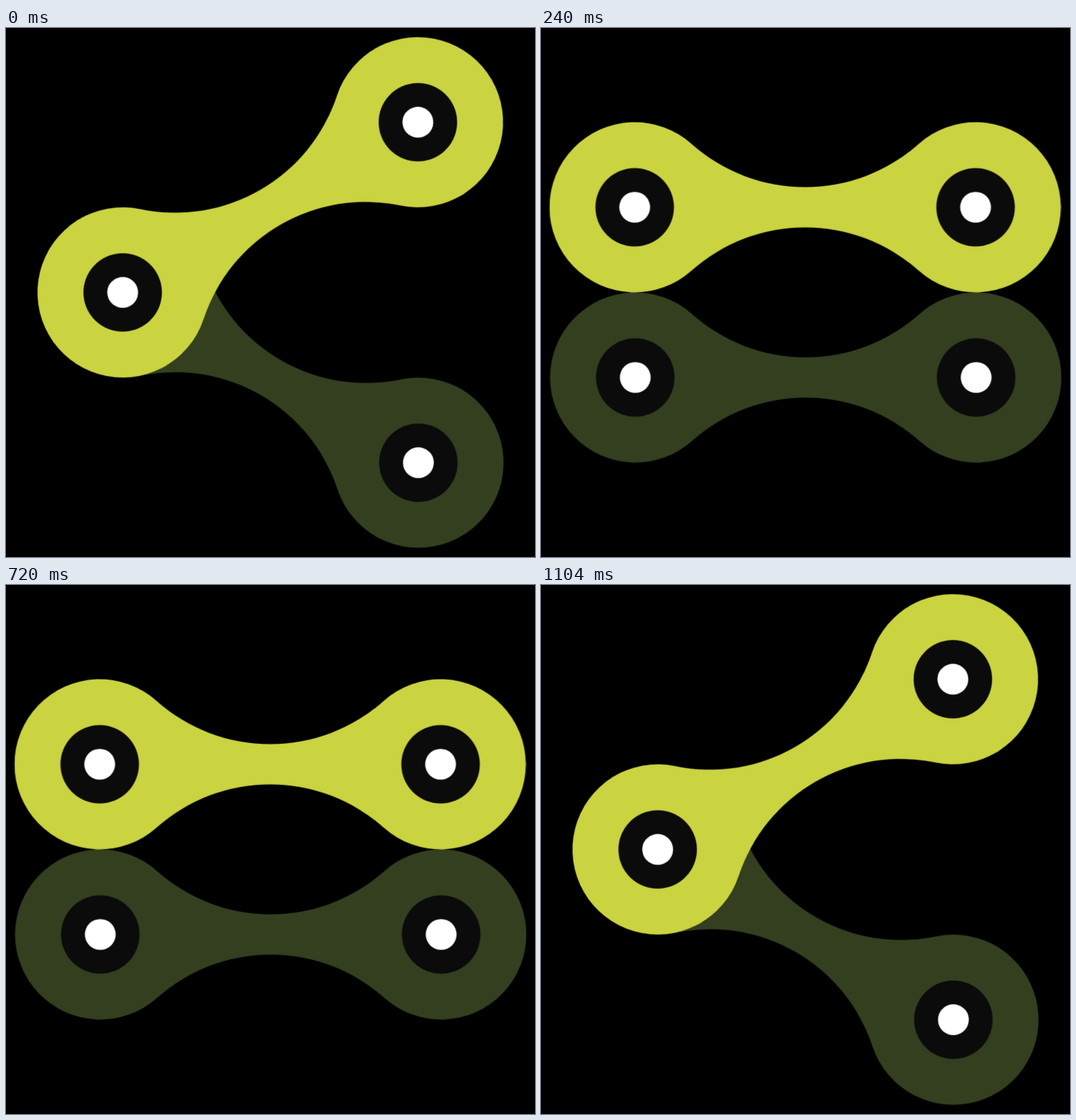
Animation of 748x749 px, one loop 1.2 s. Source, as an HTML page without scripts:

```html
<!DOCTYPE html>
<html lang="en">
<head>
<meta charset="utf-8">
<title>Chain links</title>
<style>
  html, body { margin: 0; width: 100%; height: 100%; overflow: hidden; background: #000; }
  svg { display: block; width: 100%; height: 100%; }

  .link { animation: 1200ms step-end infinite; }
  .lime { fill: #cad340; animation-name: rock-lime; }
  .moss { fill: #333f1f; animation-name: rock-moss; }
  .front { animation: 1200ms step-end infinite come-forward; }

  @keyframes rock-lime {
    0%, 80%, 100% { transform: translate(373.7px, 253.9px) rotate(-30deg); }
    20%, 60% { transform: translate(373.5px, 253.8px) rotate(0deg); }
    40% { transform: translate(374.2px, 253.7px) rotate(30deg); }
  }
  @keyframes rock-moss {
    0%, 80%, 100% { transform: translate(374.4px, 495px) rotate(30deg); }
    20%, 60% { transform: translate(374.3px, 494.8px) rotate(0deg); }
    40% { transform: translate(374.4px, 495px) rotate(-30deg); }
  }
  /* The moss link passes over the lime one only at the right-hand joint. */
  @keyframes come-forward {
    0%, 60%, 100% { visibility: hidden; }
    40% { visibility: visible; }
  }
</style>
</head>
<body>
<svg viewBox="0 0 748 749">
  <defs>
    <g id="pin">
      <circle r="55.5" fill="#0b0b0b"/>
      <circle r="21.8" fill="#fff"/>
    </g>
    <g id="link">
      <path d="M-160.67-89.83 A241 241 0 0 0 160.67-89.83 A120.5 120.5 0 1 1 160.67 89.83
               A241 241 0 0 0-160.67 89.83 A120.5 120.5 0 1 1-160.67-89.83Z"/>
      <use href="#pin" x="-241"/>
      <use href="#pin" x="241"/>
    </g>
  </defs>
  <g class="link moss"><use href="#link"/></g>
  <g class="link lime"><use href="#link"/></g>
  <g class="front"><g class="link moss"><use href="#link"/></g></g>
</svg>
</body>
</html>
```
